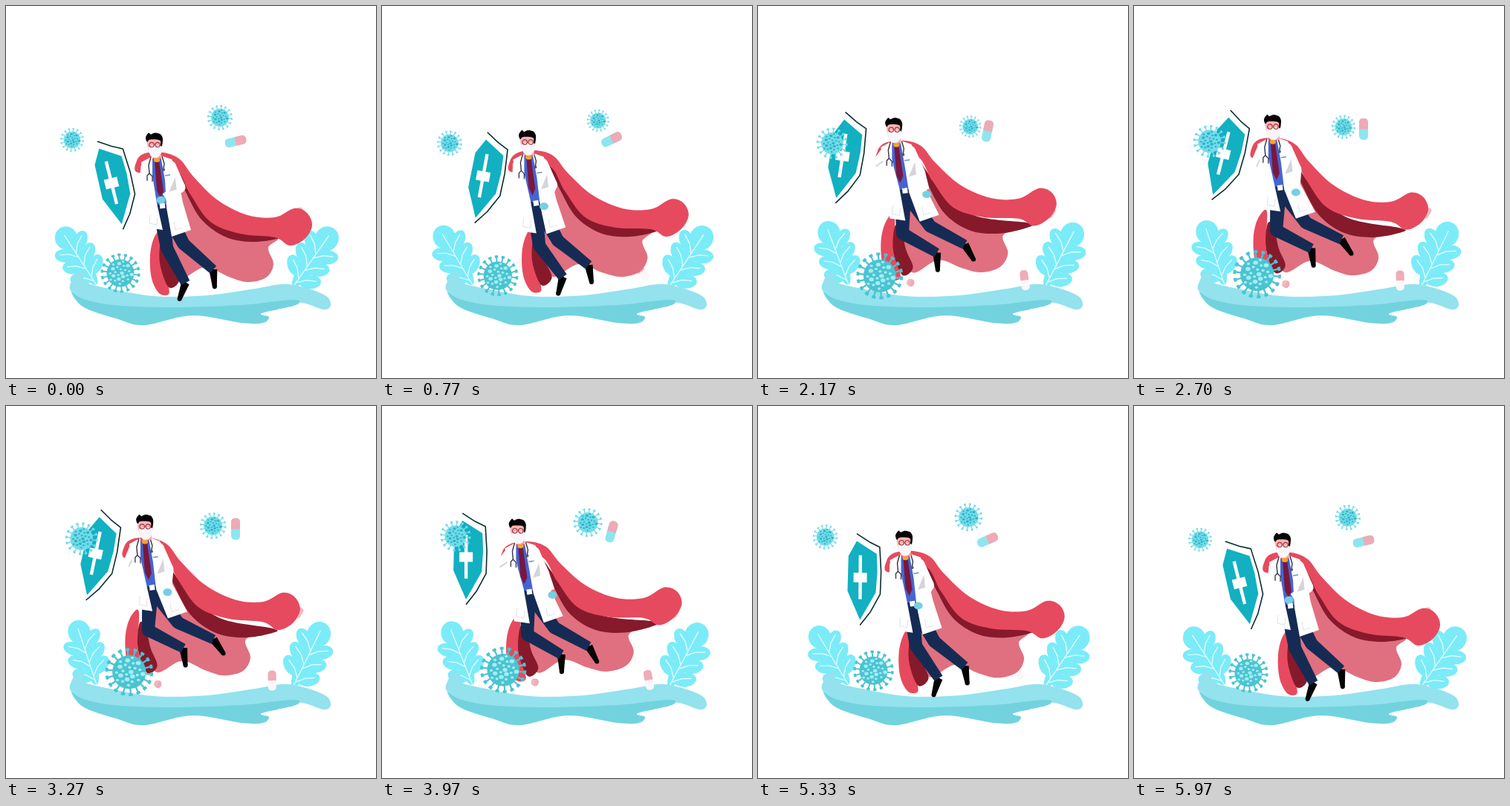
An HTML page with a canvas that plays this animation: 498x500 px, repeating every 6010 ms.

```html
<!DOCTYPE html>
<html lang="en">
<head>
<meta charset="utf-8">
<title>Caped doctor</title>
<style>
html, body { margin: 0; width: 100%; height: 100%; overflow: hidden; background: #fff; }
canvas { display: block; }
</style>
</head>
<body>
<canvas id="stage" width="498" height="500"></canvas>
<script>
const c = document.getElementById('stage').getContext('2d');
const LOOP = 6010;
const RED = '#e64a5e', PINK = '#e0707f', DARK = '#861a2b', NAVY = '#162b54',
  TEAL = '#12b0c1', AQUA = '#7cebf8', GREY = '#d5d4da', INK = '#303243', SHOE = '#050505';

// Motion state: lift runs 0 to 1 and back, drift circles, ripple wobbles between poses
let lift, drift, ripple, swell;
function setMotion(now) {
  const a = now / LOOP * Math.PI * 2;
  lift = (1 - Math.cos(a)) / 2;
  drift = Math.sin(a);
  ripple = drift * drift * Math.cos(a);
  swell = 4 * lift * (1 - lift);
}
const rise = (low, high) => low + (high - low) * lift;
const swing = (low, mid, high) => rise(low, high) + (mid - (low + high) / 2) * swell;

const pairs = a => a.flatMap((v, i) => i % 2 ? [] : [[v, a[i + 1]]]);
const add = (p, x, y) => [p[0] + x, p[1] + y];
const mix = (a, b, k) => [a[0] + (b[0] - a[0]) * k, a[1] + (b[1] - a[1]) * k];
const rad = degrees => degrees * Math.PI / 180;
// Point at a length and an angle measured from straight down
const reach = (p, degrees, length) => add(p, Math.sin(rad(degrees)) * length, Math.cos(rad(degrees)) * length);

function paint(fill) { c.fillStyle = fill; c.fill(); }

function poly(pts, fill) {
  c.beginPath();
  pts.forEach(p => c.lineTo(...p));
  c.closePath();
  paint(fill);
}

function line(pts, color, width) {
  c.beginPath();
  pts.forEach(p => c.lineTo(...p));
  c.strokeStyle = color;
  c.lineWidth = width;
  c.stroke();
}

function oval(x, y, rx, ry, fill, turn = 0) {
  c.beginPath();
  c.ellipse(x, y, rx, ry, turn, 0, 7);
  paint(fill);
}

// Closed smooth curve through the points
function blob(pts, fill) {
  const n = pts.length, at = i => pts[(i + n) % n];
  c.beginPath();
  c.moveTo(...pts[0]);
  for (let i = 0; i < n; i++) {
    const [a, b, d, e] = [at(i - 1), at(i), at(i + 1), at(i + 2)];
    c.bezierCurveTo(b[0] + (d[0] - a[0]) / 6, b[1] + (d[1] - a[1]) / 6,
      d[0] - (e[0] - b[0]) / 6, d[1] - (e[1] - b[1]) / 6, ...d);
  }
  paint(fill);
}

function limb(a, b, wa, wb, fill) {
  const g = Math.atan2(b[1] - a[1], b[0] - a[0]), x = -Math.sin(g) / 2, y = Math.cos(g) / 2;
  poly([add(a, x * wa, y * wa), add(b, x * wb, y * wb),
    add(b, -x * wb, -y * wb), add(a, -x * wa, -y * wa)], fill);
  oval(...a, wa / 2, wa / 2, fill);
}

function placed(x, y, degrees, draw, sx = 1, sy = 1) {
  c.save();
  c.translate(x, y);
  c.rotate(rad(degrees));
  c.scale(sx, sy);
  draw();
  c.restore();
}

// Stem with a round tip and three pairs of lobes
function plant() {
  const lobes = [];
  for (let i = 0; i < 3; i++)
    for (const side of [-1, 1]) lobes.push([side, -12 - 19 * i - (side > 0 ? 6 : 0)]);
  oval(0, -42, 10, 42, AQUA);
  oval(0, -75, 15, 16, AQUA);
  for (const [side, y] of lobes) oval(side * 14, y - 6, 14, 9, AQUA, -side * 0.6);
  line([[0, 0], [0, -80]], '#e9feff', 1.2);
  for (const [side, y] of lobes) line([[0, y + 5], [side * 9, y - 5], [side * 20, y - 11]], '#e9feff', 1.2);
}

function germ(x, y, r, body, dots, spikes) {
  for (let i = 0; i < spikes; i++)
    placed(x, y, i / spikes * 360 + 6, () => {
      line([[r * 0.6, 0], [r * 0.92, 0]], body, r * 0.07);
      line([[r * 0.94, -r * 0.08], [r * 0.94, r * 0.08]], body, r * 0.12);
    });
  oval(x, y, r * 0.7, r * 0.7, body);
  for (let i = 0; i < 24; i++) {
    const d = r * 0.61 * Math.sqrt((i + 0.4) / 24), a = i * 2.4, s = r * (i % 3 ? 0.055 : 0.085);
    oval(x + d * Math.cos(a), y + d * Math.sin(a), s * 1.2, s, dots);
  }
}

function pill(x, y, angle, length, width, left, right) {
  const r = width * 0.42;
  placed(x, y, angle, () => {
    c.beginPath();
    c.roundRect(-length / 2, -width / 2, length, width, r);
    paint(left);
    c.beginPath();
    c.roundRect(0, -width / 2, length / 2, width, [0, r, r, 0]);
    paint(right);
  });
}

function ground() {
  blob(pairs([88, 384, 89, 368, 97, 358, 105, 360, 106, 371, 135, 379, 200, 390, 270, 389, 335, 380, 380, 374,
    426, 387, 437, 400, 428, 408, 390, 398, 330, 408, 220, 415, 120, 405]), '#93e2ed');
  blob(pairs([88, 385, 105, 394, 145, 402, 220, 405, 315, 402, 386, 395, 390, 402, 344, 413,
    354, 418, 346, 426, 318, 426, 250, 416, 186, 429, 148, 420, 105, 405]), '#72d3df');
}

// Each layer rises by its own shift, and the far end billows up midway
function cloth(fill, dx, dy, pts) {
  blob(pairs(pts).map(([x, y]) => {
    const k = (x - 220) / 180 * swell;
    return [x + dx * lift + 6 * k, y + dy * lift - 19 * k];
  }), fill);
}

function cape() {
  cloth(PINK, -32, -8, [232, 212, 275, 275, 310, 298, 365, 310, 353, 325, 360, 347, 350, 365, 325, 371,
    300, 364, 268, 351, 235, 366, 220, 340, 215, 290]);
  cloth(DARK, -14, -5, [226, 210, 255, 250, 300, 290, 372, 305, 372, 311, 335, 317, 297, 311, 264, 288, 243, 252]);
  cloth(RED, -17, -20, [178, 224, 176, 208, 187, 198, 212, 197, 234, 206, 252, 229, 285, 261, 325, 281, 362, 284,
    388, 272, 405, 278, 412, 295, 402, 313, 382, 322, 362, 311, 315, 306, 275, 290, 248, 253, 226, 218]);
  cloth(RED, -34, -25, [212, 300, 200, 310, 194, 335, 196, 366, 206, 386, 218, 388, 219, 378, 211, 350]);
  cloth(DARK, -30, -20, [209, 312, 207, 345, 219, 378, 233, 369, 224, 345, 217, 315]);
}

function shield() {
  const x = swing(142, 119, 122) + 11 * ripple, y = swing(238, 212, 198);
  placed(x, y, swing(-14, 11, 15) + 30 * ripple + 5 * drift, () => {
    const rim = pairs([-5, -59, 12, -48, 26, -41, 28, -8, 27, 22, 14, 46, 0, 64]);
    poly([...rim, [-21, 20], [-19, -34]], '#fff');
    line(rim, '#0b2c33', 1.6);
    poly(pairs([-5, -49, 22, -32, 23, -8, 21, 20, 0, 57, -17, 18, -16, -29]), TEAL);
    c.fillStyle = '#fff';
    c.fillRect(-2.2, -30, 4.4, 59);
    c.fillRect(-9, -6.5, 18, 13);
  });
}

function leg(hip, thigh, shin, foot) {
  const knee = reach(hip, thigh, 55), ankle = reach(knee, shin, 53), toe = reach(ankle, foot, 23);
  limb(toe, ankle, 6, 11, SHOE);
  oval(...mix(ankle, toe, 0.15), 5, 4, SHOE);
  limb(hip, knee, 22, 17, NAVY);
  limb(knee, ankle, 17, 13, NAVY);
}

function head([x, y]) {
  placed(x, y, 0, () => {
    poly(pairs([-6, 8, 7, 6, 8, 19, -4, 19]), '#f3a9a9');
    blob(pairs([-10, -7, 8, -7, 9, 5, 4, 14, -6, 14, -10, 5]), '#f9b6b4');
    blob(pairs([-9, 4, 0, 2, 9, 4, 8, 12, 3, 18, -4, 18, -8, 12]), '#f7f6fb');
    blob(pairs([-11, -3, -13, -9, -9, -15, -6, -13, -1, -15, 5, -14, 8, -12, 10, -7, 9, 2, 7, 2, 6, -5, -7, -6]), SHOE);
    for (const ex of [-5, 3]) {
      c.beginPath();
      c.arc(ex, 1, 3.2, 0, 7);
      c.strokeStyle = '#a3303f';
      c.lineWidth = 1.2;
      c.stroke();
    }
  });
}

function doctor() {
  const collar = [swing(203, 189, 187), swing(206, 194, 181)];
  const at = (x, y) => add(collar, x, y);
  const belt = at(swing(6, 11, 8), 63);
  const hemL = add(belt, -19, swing(29, 44, 27)), hemR = add(belt, rise(40, 49), 32);
  const shoulderL = at(-13, 11), shoulderR = at(18, 10);
  const wrist = reach(shoulderL, swing(-13, -31, -26) + 35 * ripple, 30);
  const elbow = reach(shoulderR, 26, 31), hand = reach(elbow, swing(-57, 23, -5), 31);

  leg(add(belt, 4, 2), rise(28, 36), rise(49, 65), rise(5, 36));
  leg(add(belt, -1, 2), rise(9, -3), swing(28, 52, 63), rise(-20, 8));

  limb(shoulderL, wrist, 17, 10, '#fff');
  line([add(shoulderL, -2, 10), add(wrist, 6, -3)], GREY, 2);
  poly([at(-9, 0), at(9, 0), add(belt, 9, 0), add(belt, -9, 0)], '#4564d2');
  poly([at(-3, 2), at(3, 2), at(9, 43), at(5, 52), at(0, 42)], '#79173c');
  oval(...at(0, 1), 4, 3, '#f0a72f');
  line([add(belt, -10, 0), add(belt, 10, 0)], NAVY, 4);
  line([add(belt, -2, 0), add(belt, 5, -1)], '#fff', 7);

  poly([at(-6, -4), at(-21, 4), at(-16, 34), hemL, add(hemL, 21, 3), add(belt, -6, -4), at(-6, 22)], '#fff');
  poly([at(5, -5), at(20, 0), at(26, 12), add(belt, 29, -5), hemR, add(hemR, -26, 9), add(belt, 7, 2), at(11, 28)], '#fff');
  line([add(hemL, 4, -17), add(hemL, 3, -6), add(hemL, 13, -4), add(hemL, 14, -14)], '#e2e1e6', 1);
  line([add(hemR, -23, -11), add(hemR, -21, 0), add(hemR, -11, -3)], '#e2e1e6', 1);

  oval(...hand, 6, 5, '#76cfe2');
  limb(shoulderR, elbow, 16, 14, '#fff');
  limb(elbow, mix(elbow, hand, 0.8), 14, 11, '#fff');
  poly([mix(shoulderR, elbow, 0.5), add(elbow, -5, 3), add(elbow, -15, 6)], GREY);
  line([at(11, 22), at(18, 21)], '#6c93c5', 1.5);

  line([at(-8, -3), at(-11, 8), at(-10, 19)], INK, 1.4);
  line([at(-13, 29), at(-13, 22), at(-10, 19), at(-6, 23), at(-6, 30)], INK, 1.3);
  line([at(7, -4), at(10, 6), at(9, 13)], INK, 1.4);
  oval(...at(9, 14), 2, 2, '#555766');
  head(at(swing(-2, -2, 2) + 6 * ripple, -20.5));
}

function draw(now) {
  setMotion(now);
  c.fillStyle = '#fff';
  c.fillRect(0, 0, 498, 500);
  c.lineJoin = 'round';
  placed(122, 375, rise(-33, -18), plant);
  placed(386, 378, rise(35, 26), plant, -1.06, 1.06);
  ground();
  pill(swing(344, 357, 358), swing(352, 365, 369), rise(-135, -90), 27, 11, '#fbf6f8', '#efacb7');
  pill(rise(211, 204), rise(362, 374), 20, 10, 10, '#f2b8c0', '#efacb7');
  pill(394, 278, -60, 15, 9, '#f2bcc4', '#f2bcc4');
  cape();
  doctor();
  shield();
  germ(rise(89, 102), 180 + 6 * drift, rise(16, 22), '#72dcea', '#2fb4c6', 16);
  germ(rise(288, 280) + 5.6 * drift, rise(150, 162) + 3 * drift, 17 - 2.8 * drift, '#72dcea', '#2fb4c6', 16);
  germ(rise(154, 166), 359 + 5 * drift, rise(26.5, 32.5), '#4bc3d1', '#a2edf4', 18);
  pill(309, rise(182, 165), rise(-14, -92), 29, 12, '#8ee5f0', '#eeaab5');
  requestAnimationFrame(draw);
}
requestAnimationFrame(draw);
</script>
</body>
</html>
```
